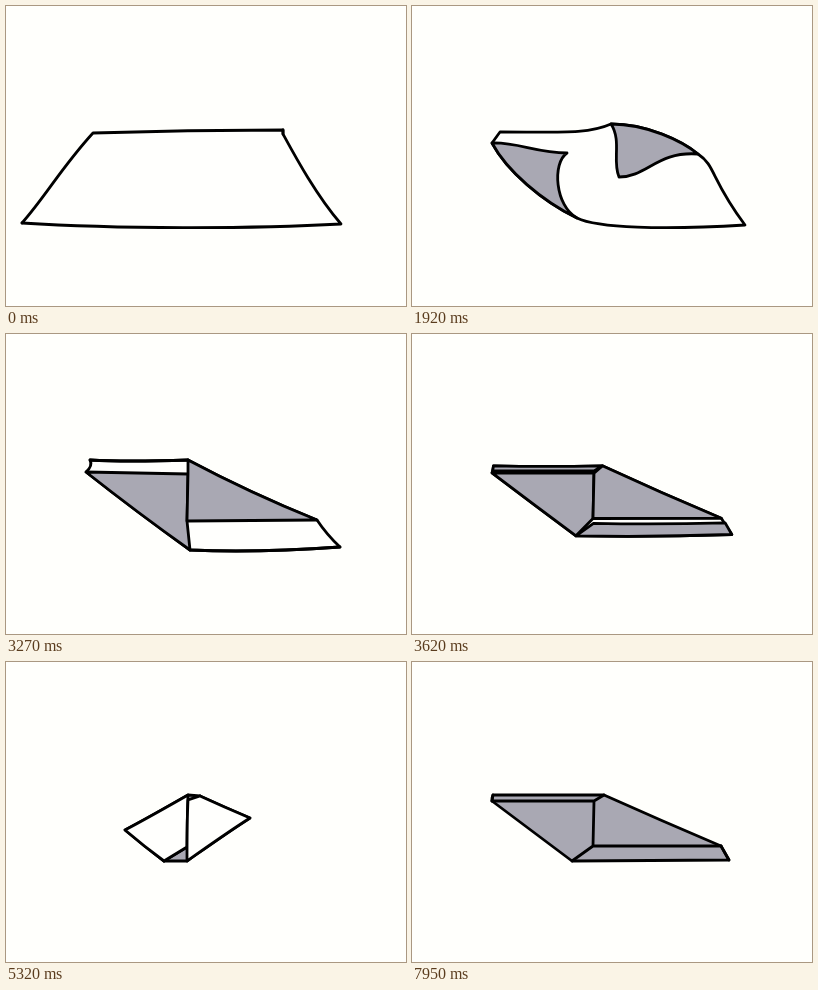
Write an HTML page that moves like this. It is 400x300 px and loops after 8000 ms.

```html
<!DOCTYPE html>
<html lang="en">
<head>
<meta charset="utf-8">
<title>Paper folding</title>
<style>
html, body { margin: 0; height: 100%; overflow: hidden; background: #fffffc; }
svg { display: block; width: 100%; height: 100%; stroke: #000; stroke-width: 2.8; stroke-linejoin: round; stroke-linecap: round; }
</style>
</head>
<body>
<svg id="stage" viewBox="0 0 400 300"></svg>
<script>
const FRONT = '#fffffd', BACK = '#a9a8b3', STEP = 70, LOOP = 8000;

// Each scene has one fill per shape and poses of [progress, ...paths].
const corners = {
  fills: [FRONT, BACK, BACK],
  poses: [
    [0,
      'M87 127C150 125 225 124 277 124C277 125 277 126 277 128C289 150 310 189 335 218C245 223 110 223 16 217C16 217 16 217 16 217C40 190 55 162 87 127Z',
      'M16 217C16 217 16 217 16 217C16 217 16 217 16 217C16 217 16 217 16 217Z',
      'M277 124C277 124 277 124 277 124C277 125 277 126 277 128C277 126 277 125 277 124Z'],
    [7 / 12,
      'M88 126C150 126 177 128 199 118C235 118 270 135 286 148C304 160 298 172 333 219C250 224 185 222 165 212C130 195 95 165 80 137C83 133 85 130 88 126Z',
      'M80 137C105 136 125 147 155 147C140 157 143 200 165 212C130 195 95 165 80 137Z',
      'M199 118C210 135 200 155 207 171C235 171 245 145 286 148C270 135 235 118 199 118Z'],
    [1,
      'M87 126C120 127 160 126 182 125C220 147 270 166 311 185C317 195 327 210 335 218C290 219 230 219 184 216C150 191 115 164 80 138C82 134 85 130 87 126Z',
      'M80 138C115 140 150 140 182 140C182 165 183 190 184 216C150 191 115 164 80 138Z',
      'M182 125C183 145 182 165 182 187C220 186 270 187 311 185C270 166 220 147 182 125Z']
  ]
};

const strips = {
  fills: [FRONT, BACK, BACK, BACK, BACK],
  poses: [
    [0,
      'M84 126Q120 128 182 126Q244 159 311 186Q321 201 334 213Q250 219 184 216Q132 179 80 138Q87 132 84 126Z',
      'M80 138L182 140L181 187L184 216Q132 179 80 138Z',
      'M182 126L182 140L181 187L311 186Q244 159 182 126Z',
      'M84 126Q120 128 182 126L182 126Q120 128 84 126Z',
      'M184 216Q250 219 334 213L334 213Q250 219 184 216Z'],
    [1,
      'M81 133Q135 134 192 133Q250 159 309 184Q313 191 317 198Q240 200 160 199Q120 169 80 139Q80 136 81 133Z',
      'M80 139L182 139L181 184L160 199Q120 169 80 139Z',
      'M192 133L182 139L181 184L309 184Q250 159 192 133Z',
      'M81 133Q135 134 192 133L182 139Q130 139 80 139Z',
      'M160 199Q240 200 317 198L309 184Q245 185 181 184Z']
  ]
};

const ends = {
  fills: [BACK, 'none', FRONT, FRONT],
  poses: [
    [0,
      'M80 139C80 137 80 135 81 133L192 133Q250 159 309 184C312 189 314 193 317 198L160 199Q120 169 80 139Z',
      'M80 139L182 139L181 184L160 199M182 139L192 133M181 184L309 184',
      'M80 139C80 137 80 135 81 133Q81 133 81 133L80 139Q80 139 80 139Z',
      'M309 184C312 189 314 193 317 198C317 198 317 198 317 198L309 184Q309 184 309 184Z'],
    [.1,
      'M82 138C85 137 88 135 93 134L192 133Q250 159 310 184C314 192 303 197 280 199L160 199Q125 174 82 138Z',
      'M82 138L182 139L181 185L160 199M182 139L192 133M181 185L310 185',
      'M82 138C85 137 88 135 93 134Q90 132 88 129L83 135Q82 137 82 138Z',
      'M310 184C314 192 303 197 280 199C290 199 305 200 314 196L312 187Q311 185 310 184Z'],
    [.5,
      'M100 150C108 135 125 122 140 125L192 133Q235 153 278 172C285 180 275 197 252 199L160 199Q130 176 100 150Z',
      'M112 139L182 139L181 185L160 199M182 139L192 133M181 185L276 185',
      'M100 150C108 135 125 122 140 125Q129 142 135 160L118 165Q106 160 100 150Z',
      'M278 172C285 180 275 197 252 199C246 190 246 180 248 172L253 160Q265 164 278 172Z'],
    [.9,
      'M122 160C124 153 160 138 181 134L192 134Q215 134 246 157C249 165 207 188 183 200L159 200Q136 189 122 160Z',
      'M170 139L182 139L181 185L159 200M182 139L192 134M181 185L192 185',
      'M122 160C124 153 160 138 181 134Q170 156 178 186L157 191Q143 168 122 160Z',
      'M246 157C249 165 207 188 183 200C195 178 176 165 184 137L196 135Q215 134 246 157Z'],
    [1,
      'M119 168C140 157 161 145 182 133L194 134Q218 145 244 156C222 170 201 185 181 199L158 199Q139 185 119 168Z',
      'M182 138L182 138L181 185L158 199M182 138L194 134M181 185L181 185',
      'M119 168C140 157 161 145 182 133Q181 160 181 185L158 199Q139 185 119 168Z',
      'M244 156C222 170 201 185 181 199C181 178 181 158 182 138L194 134Q218 145 244 156Z']
  ]
};

const stage = document.getElementById('stage');

function mixPath(from, to, k) {
  const targets = to.match(/\d+/g);
  let i = 0;
  return from.replace(/\d+/g, n => (+n + (targets[i++] - n) * k).toFixed(2) + ' ');
}

function draw({ fills, poses }, progress) {
  const next = Math.max(1, poses.findIndex(pose => pose[0] >= progress - 1e-9));
  const [start, ...from] = poses[next - 1];
  const [end, ...to] = poses[next];
  const k = (progress - start) / (end - start);
  stage.innerHTML = fills.map((fill, i) =>
    `<path fill="${fill}" d="${mixPath(from[i], to[i], k)}"/>`).join('');
}

// Number of drawings shown since a movement began, the first one at once.
const steps = (t, start, count) =>
  t < start ? 0 : Math.min(count, Math.floor((t - start) / STEP) + 1);

function frame(now) {
  const t = now % LOOP;
  if (t < 3270) draw(corners, steps(t, 1500, 12) / 12);
  else if (t < 4690) draw(strips, (steps(t, 3270, 7) - 1) / 6);
  else draw(ends, (steps(t, 4690, 10) - steps(t, 7320, 10)) / 10);
  requestAnimationFrame(frame);
}
frame(0);
</script>
</body>
</html>
```
